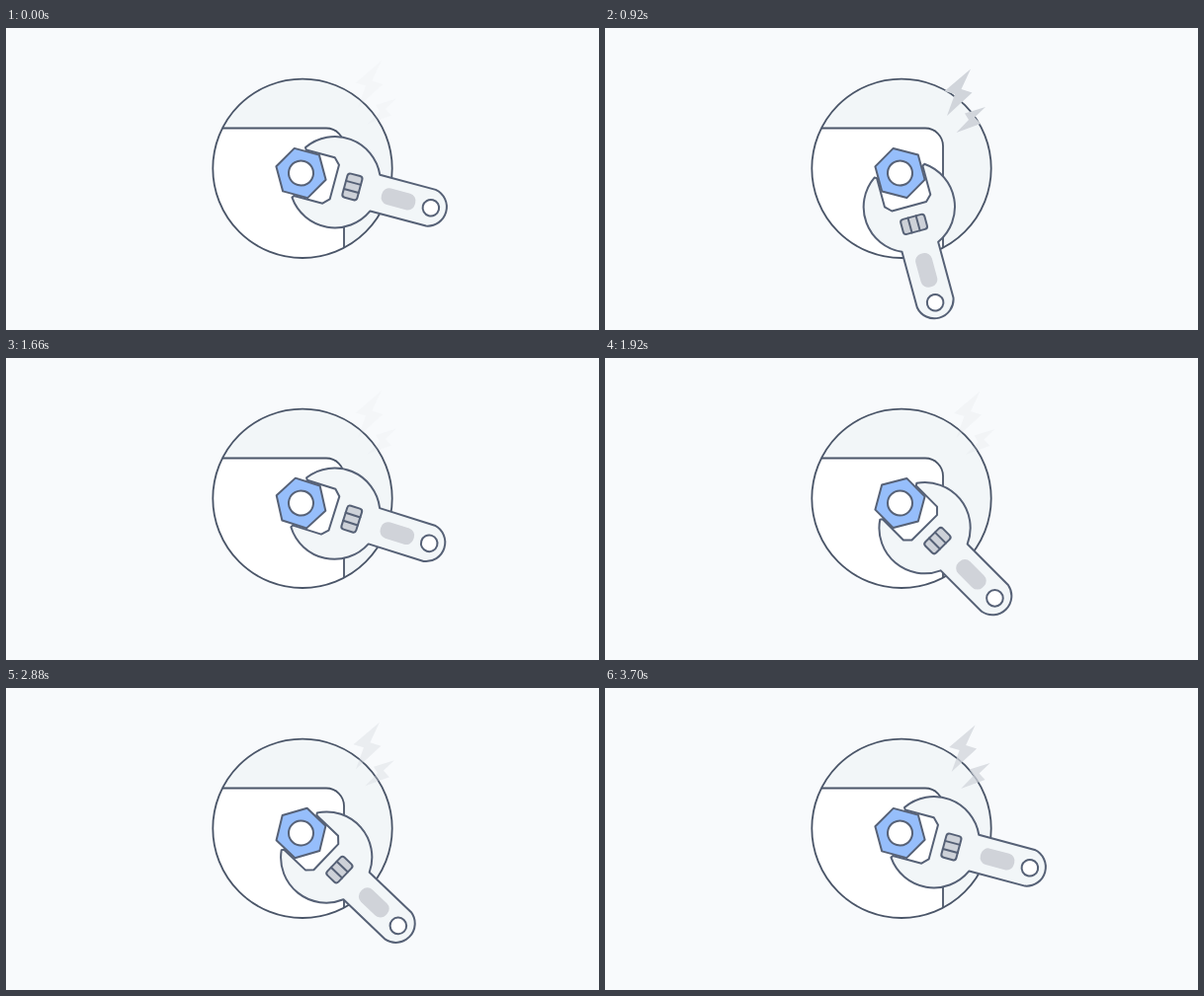
An HTML page that plays this animation: 600 px wide and 306 px high, repeating every 3.72 s.

```html
<!DOCTYPE html>
<html lang="en">
<head>
<meta charset="utf-8">
<title>Wrench and nut</title>
<style>
  html, body { margin: 0; width: 100%; height: 100%; overflow: hidden; background: #f8fafc; }
  svg { display: block; width: 600px; height: 306px; }
  .line { stroke: #4a5568; stroke-width: 1.8; stroke-linejoin: round; }
  .tool { stroke: #566176; stroke-width: 2; stroke-linejoin: round; stroke-linecap: round; }
</style>
</head>
<body>
<svg viewBox="0 0 600 306">
  <defs>
    <clipPath id="disc"><circle cx="300" cy="142.3" r="90.7"/></clipPath>
  </defs>

  <circle cx="300" cy="142.3" r="90.7" fill="#f2f6f8"/>
  <path class="line" clip-path="url(#disc)" fill="#fff"
        d="M190 101.5H324A18 18 0 0 1 342 119.5V250H190Z"/>
  <circle class="line" cx="300" cy="142.3" r="90.7" fill="none"/>

  <g id="bolts" fill="#d1d5db">
    <path d="M380 33L353.5 55.5L364 58.5L356 80.5L381.5 57L370.5 53.5Z"/>
    <path d="M395 71.5L374 78L378 84.5L365.5 97.5L390 88.5L384 82Z"/>
  </g>

  <g id="wrench" class="tool">
    <path fill="#f2f6f8" d="M-2.4 -26.2A46 46 0 0 1 77.5 -19H136A19.3 19.3 0 0 1 136 19H77.5
      A46 46 0 0 1 -2.4 26.2L-1 24H29L35 18V-18L29 -24H-1Z"/>
    <rect x="46" y="-12.5" width="15.5" height="25" rx="3" fill="#cdd1d8"/>
    <path d="M46 -4.2H61.5M46 4.2H61.5"/>
    <rect x="84.5" y="-8.5" width="35" height="17" rx="7.5" fill="#d0d3d9" stroke="none"/>
    <circle cx="136" cy="0" r="8.3" fill="#fff"/>
    <path fill="#96befb" d="M26 0L13 22.5H-13L-26 0L-13 -22.5H13Z"/>
    <circle r="12.5" fill="#fff"/>
  </g>
</svg>
<script>
  const LOOP = 3720;
  const wrench = document.getElementById("wrench");
  const bolts = document.getElementById("bolts");

  const sine = p => (1 - Math.cos(Math.PI * p)) / 2;
  const cubic = p => p < 0.5 ? 4 * p ** 3 : 1 - 4 * (1 - p) ** 3;
  const clamp = v => Math.max(0, Math.min(1, v));

  // start, end, degrees turned, easing
  const turns = [
    [40, 880, 60, cubic],
    [900, 1480, -60, sine],
    [1570, 2270, 60, sine],
    [2270, 2750, -30, sine],
    [2750, 3720, -30, sine]
  ];

  function angleAt(t) {
    return turns.reduce((sum, [a, b, deg, ease]) =>
      sum + deg * ease(clamp((t - a) / (b - a))), 15);
  }

  function sparkAt(t) {
    const phase = t % 1570;
    return clamp(Math.min(phase - 330, 1400 - phase) / 430);
  }

  function draw(t) {
    const u = sparkAt(t);
    wrench.setAttribute("transform", `translate(298.5 147) rotate(${angleAt(t)})`);
    bolts.setAttribute("transform", `translate(${-10 * u} ${8.5 * u})`);
    bolts.setAttribute("opacity", clamp(0.09 + 1.2 * u));
  }

  const start = performance.now();
  function tick(now) {
    draw(Math.max(0, now - start) % LOOP);
    requestAnimationFrame(tick);
  }
  draw(0);
  requestAnimationFrame(tick);
</script>
</body>
</html>
```
